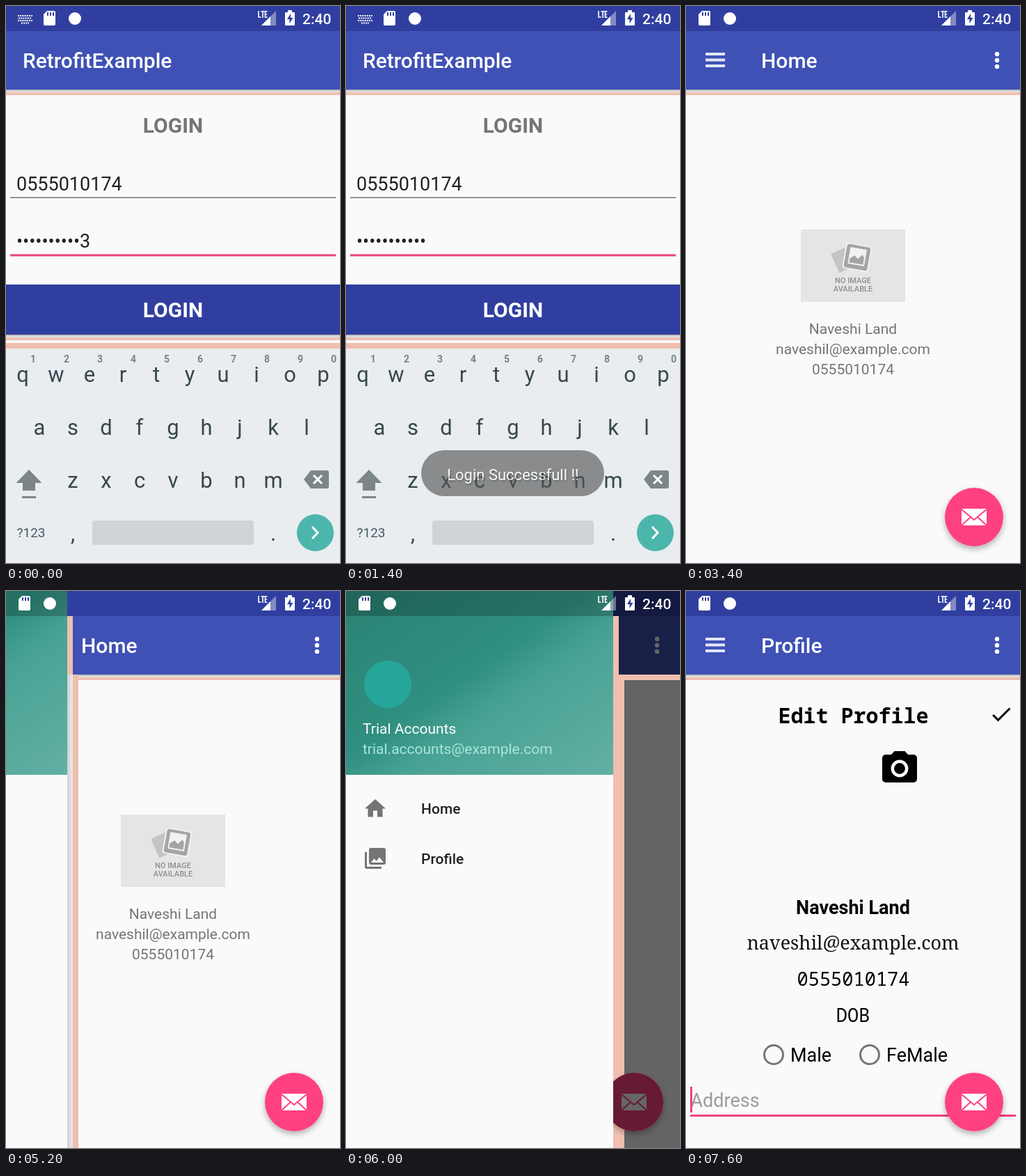
These frames come from a looping animation (480x800 px, 8 s). An HTML page:

```html
<!DOCTYPE html>
<html lang="en">
<head>
<meta charset="utf-8">
<title>Login demo</title>
<style>
html, body { margin: 0; height: 100%; overflow: hidden; background: #fafafa; }
svg { display: block; width: 100vw; height: 100vh; font-family: Roboto, sans-serif; }
.mid { text-anchor: middle; }
.title { font-size: 30px; font-weight: 500; fill: #fff; }
.big { font-size: 27px; }
.small { font-size: 21px; }
.med { font-weight: 500; }
.bold { font-weight: 700; }
.mono { font-family: "Noto Sans Mono", monospace; }
.serif { font-family: "Noto Serif", serif; }
.grey { fill: #757575; }
.white { fill: #fff; }
.band { fill: #efbfaf; }
.key { font-size: 31px; fill: #37474f; text-anchor: middle; }
.hint { font-size: 14px; font-weight: 700; fill: #78828a; text-anchor: middle; }
.line { fill: none; stroke-width: 3; }
</style>
</head>
<body>
<svg viewBox="0 0 480 800">
  <defs>
    <linearGradient id="teal" x1="0" y1="0" x2="1" y2="1">
      <stop offset="0" stop-color="#2b8273"/>
      <stop offset=".45" stop-color="#2f8f80"/>
      <stop offset=".6" stop-color="#48a294"/>
      <stop offset="1" stop-color="#62b0a3"/>
    </linearGradient>
    <linearGradient id="drop" x2="0" y2="1">
      <stop offset="0" stop-color="#000" stop-opacity=".3"/>
      <stop offset="1" stop-color="#000" stop-opacity=".04"/>
    </linearGradient>
    <linearGradient id="side">
      <stop offset="0" stop-color="#cfcfcf"/>
      <stop offset="1" stop-color="#ececec"/>
    </linearGradient>
    <filter id="soft" x="-20%" y="-20%" width="140%" height="150%">
      <feDropShadow dx="0" dy="4" stdDeviation="4" flood-opacity=".3"/>
    </filter>
    <clipPath id="above"><rect width="480" height="492"/></clipPath>
    <g id="bars">
      <rect width="480" height="800" fill="#fafafa"/>
      <rect width="480" height="36" fill="#303f9f"/>
      <rect y="36" width="480" height="84" fill="#3f51b5"/>
      <rect y="120" width="480" height="4" fill="url(#drop)"/>
    </g>
  </defs>

  <g id="login">
    <use href="#bars"/>
    <text class="title" x="24" y="89">RetrofitExample</text>
    <text class="mid bold grey" x="240" y="182" font-size="30">LOGIN</text>
    <text class="big" x="15" y="265" fill="#212121">0555010174</text>
    <rect x="6" y="274.5" width="468" height="1.5" class="grey"/>
    <text id="pass" class="big" x="15" y="347" fill="#212121"></text>
    <rect x="6" y="356.5" width="468" height="3" fill="#e8437f"/>
    <rect id="button" y="400" width="480" height="72"/>
    <rect y="472" width="480" height="4" fill="url(#drop)"/>
    <rect class="band" y="476" width="480" height="4"/>
    <rect class="band" y="484" width="480" height="8"/>
    <text class="mid bold white" x="240" y="447" font-size="30">LOGIN</text>
  </g>

  <g id="app">
    <use href="#bars"/>
    <path class="line" stroke="#e3e7f7" style="stroke-width:4" d="M28 69h28M28 77.5h28M28 86h28"/>
    <text id="heading" class="title" x="108" y="89"></text>
    <g class="white"><circle cx="447" cy="69" r="3.2"/><circle cx="447" cy="78" r="3.2"/><circle cx="447" cy="87" r="3.2"/></g>

    <g id="home" class="mid small grey">
      <g id="picture">
        <rect x="165" y="321" width="150" height="104" fill="#e4e5e5"/>
        <rect x="-14" y="-15" width="28" height="30" rx="2" fill="#c3c4c4" transform="translate(227 364) rotate(-24)"/>
        <g transform="translate(246 361) rotate(10)">
          <rect x="-19" y="-19" width="38" height="38" rx="4" fill="#f1f1f1"/>
          <rect x="-17" y="-17" width="34" height="34" rx="3" fill="#a2a4a5"/>
          <rect x="-12" y="-13" width="24" height="24" rx="1" fill="#f1f1f1"/>
          <path fill="#a2a4a5" d="M-10 9V3l6-5 5 4 6-7 3 4V9z"/>
        </g>
        <g font-size="11" class="med" fill="#8d8f90">
          <text x="240" y="398">NO IMAGE</text>
          <text x="240" y="410">AVAILABLE</text>
        </g>
      </g>
      <text x="240" y="471">Naveshi Land</text>
      <text x="240" y="500">naveshil@example.com</text>
      <text x="240" y="529">0555010174</text>
    </g>

    <g id="profile">
      <text class="mid mono" font-weight="600" x="240.5" y="190" font-size="30">Edit Profile</text>
      <path transform="translate(435 159) scale(1.5)" d="M9 16.17 4.83 12l-1.42 1.41L9 19 21 7l-1.41-1.41z"/>
      <path transform="translate(277 225) scale(2.5)" d="M9 2 7.2 4H4a2 2 0 0 0-2 2v12a2 2 0 0 0 2 2h16a2 2 0 0 0 2-2V6a2 2 0 0 0-2-2h-3.2L15 2z"/>
      <circle cx="307" cy="255" r="10.2" fill="none" stroke="#fafafa" stroke-width="4.5"/>
      <g class="mid big">
        <text class="bold" x="240" y="464">Naveshi Land</text>
        <text class="serif" x="240" y="515" fill="#111">naveshil@example.com</text>
        <text class="mono med" x="240.5" y="567">0555010174</text>
        <text class="mono" x="240" y="619">DOB</text>
      </g>
      <circle class="line" stroke="#757575" cx="126" cy="666" r="13.5"/>
      <circle class="line" stroke="#757575" cx="264" cy="666" r="13.5"/>
      <g class="big">
        <text x="150" y="676">Male</text>
        <text x="288" y="676">FeMale</text>
        <text x="6.5" y="741" fill="#9c9c9c">Address</text>
      </g>
      <path fill="#f0407f" d="M6 712h3v37H6zM6 752h468v3H6z"/>
    </g>
  </g>

  <rect id="scrim" width="480" height="800"/>
  <rect id="topBand" class="band" width="480"/>
  <g id="edges">
    <path class="band" d="M0 36h8v84h-8zM8 120h8v680h-8z"/>
    <rect id="edge" y="120" width="8" height="680"/>
  </g>

  <g id="fab">
    <circle cx="414" cy="734" r="42" fill="#ff4081" filter="url(#soft)"/>
    <rect class="white" x="396" y="722" width="36" height="24" rx="1"/>
    <path class="line" stroke="#ff4081" style="stroke-width:2" d="M396 723l18 15 18-15M396 746l13-12M432 746l-13-12"/>
    <circle id="fabScrim" cx="414" cy="734" r="42"/>
  </g>

  <g id="keyboard">
    <rect y="492" width="480" height="308" fill="#e9edef"/>
    <g id="keys"></g>
    <path fill="#7c868a" d="M33 666l18.500 19H42v11H24V685h-9.500zM23 704h20v3H23z"/>
    <path fill="#7c868a" d="M438 667h23q3 0 3 3v20q0 3-3 3h-23l-10-13z"/>
    <path class="line" stroke="#fff" d="M442 674l12 12M454 674l-12 12"/>
    <text class="mid" x="36" y="763" font-size="19" fill="#455a64">?123</text>
    <rect x="124" y="739" width="232" height="35" rx="4" fill="#cfd4d8"/>
    <circle cx="444.5" cy="756.5" r="26.5" fill="#4db6ac"/>
    <path class="line" stroke="#fff" d="M440 748l8 8.500-8 8.500"/>
  </g>

  <g id="drawer">
    <rect width="384" height="800" fill="#fafafa"/>
    <rect width="384" height="264" fill="url(#teal)"/>
    <rect width="384" height="36" opacity=".22"/>
    <circle cx="60" cy="134" r="34" fill="#26a69a"/>
    <g class="small">
      <text class="white" x="24" y="205">Trial Accounts</text>
      <text x="24" y="234" fill="#a9e6df">trial.accounts@example.com</text>
      <g class="med" fill="#212121">
        <text x="108" y="320">Home</text>
        <text x="108" y="392">Profile</text>
      </g>
    </g>
    <path class="grey" transform="translate(24 294.5) scale(1.5)" d="M10 20v-6h4v6h5v-8h3L12 3 2 12h3v8z"/>
    <path class="grey" transform="translate(24 366) scale(1.5)" d="M22 16V4a2 2 0 0 0-2-2H8a2 2 0 0 0-2 2v12a2 2 0 0 0 2 2h12a2 2 0 0 0 2-2zm-11-4 2 2.700L16 11l4 5H8zM2 6v14a2 2 0 0 0 2 2h14v-2H4V6z"/>
  </g>

  <g id="status" class="white">
    <g id="notices">
      <path id="typing" fill="none" stroke="#fff" stroke-width="2" stroke-dasharray="2 1.2" d="M17 14h21M18 17.500h19M17 21h21M22 24.500h11"/>
      <path d="M59 7h10q2 0 2 2v17q0 2-2 2H56q-2 0-2-2V12z"/>
      <path stroke="#303f9f" stroke-width="2" d="M60 9v5M64 9v5M68 9v5"/>
      <circle cx="99" cy="18" r="9"/>
    </g>
    <path fill="none" stroke="#fff" stroke-width="1.6" d="M363 7v9h3.500M366.500 7.800h5M369 7.800V17M375.500 7.800H372.500v8.400h3M372.500 12h2.500"/>
    <path opacity=".4" d="M367 28h21V7z"/>
    <path d="M367 28h13V15z"/>
    <path d="M405 6h6v3h3q1 0 1 1v17q0 1-1 1h-12q-1 0-1-1V10q0-1 1-1h3z"/>
    <path fill="#303f9f" d="M409 11l-5 8h3.500v6l5-8H409z"/>
    <text class="small med" x="426" y="26">2:40</text>
  </g>

  <rect id="dim" width="480" height="800"/>
  <g id="dialog">
    <rect x="24" y="203" width="432" height="135" rx="3" fill="#fff" filter="url(#soft)"/>
    <circle class="line" cx="96" cy="270" r="28" stroke="#ff4081" style="stroke-width:6" stroke-dasharray="120 56"/>
  </g>

  <g id="toast">
    <rect x="108" y="638" width="263" height="66" rx="33" fill="#545454" opacity=".9"/>
    <text class="mid white" x="240" y="681" font-size="22" style="text-shadow:1px 2px 2px #0008">Login Successfull !!</text>
  </g>
</svg>
<script>
const $ = id => document.getElementById(id);
const set = (id, attrs) => { for (const k in attrs) $(id).setAttribute(k, attrs[k]); };
const show = (id, on) => set(id, { visibility: on ? 'inherit' : 'hidden' });
const fade = (id, a) => set(id, { opacity: a });
const moveX = (id, x) => set(id, { transform: `translate(${x})` });
const clamp = v => Math.max(0, Math.min(1, v));

const label = (cls, x, y, s) => `<text class="${cls}" x="${x}" y="${y}">${s}</text>`;
const row = (chars, x, y) => [...chars].map((c, i) => label('key', x + 48 * i, y, c)).join('');
$('keys').innerHTML = row('qwertyuiop', 24, 540) + row('asdfghjkl', 48, 616) + row('zxcvbnm', 96, 692)
  + row(',', 96, 768) + row('.', 384, 768)
  + [...'1234567890'].map((c, i) => label('hint', 39 + 48 * i, 512, c)).join('');

function draw(t) {
  const pressed = t >= 600 && t < 1200;
  const typing = t < 1800;
  const onProfile = t >= 7000;

  // login screen
  $('pass').textContent = '•'.repeat(10) + (t < 600 ? '3' : '•');
  set('button', { fill: pressed ? '#4453a9' : '#303f9f' });
  fade('dialog', t < 800 || t >= 1200 ? 0 : t < 1000 ? 0.5 : 1);
  fade('dim', t >= 1000 && t < 1200 ? 0.55 : 0);
  show('keyboard', typing);
  show('typing', typing);
  moveX('notices', typing ? 0 : -36);

  // home fades in above the keyboard, then profile replaces it
  fade('app', clamp((t - 1460) / 200));
  set('app', { 'clip-path': typing ? 'url(#above)' : 'none' });
  $('heading').textContent = onProfile ? 'Profile' : 'Home';
  show('home', !onProfile);
  show('profile', onProfile);
  show('picture', t >= 3200 && !onProfile);
  show('fab', !typing);
  fade('toast', Math.min(clamp((t - 1260) / 200), clamp((3375 - t) / 500)));

  // drawer
  const opened = 1 - (1 - clamp((t - 5100) / 900)) ** 2.2;
  const slide = Math.min(opened, clamp((7200 - t) / 400));
  const shade = slide < 0.25 ? 0 : 0.6 * slide;
  const right = Math.round(384 * slide);
  show('drawer', slide > 0);
  show('edges', slide > 0);
  moveX('drawer', right - 384);
  moveX('edges', right);
  set('edge', { fill: slide < 1 ? 'url(#side)' : '#efbfaf' });
  fade('scrim', shade);
  fade('fabScrim', shade);
  set('topBand', shade ? { y: 120, height: 8 } : { y: 124, height: 4 });
}

function tick() {
  draw(Math.floor(performance.now() % 8000 / 200) * 200);
  requestAnimationFrame(tick);
}
tick();
</script>
</body>
</html>
```
